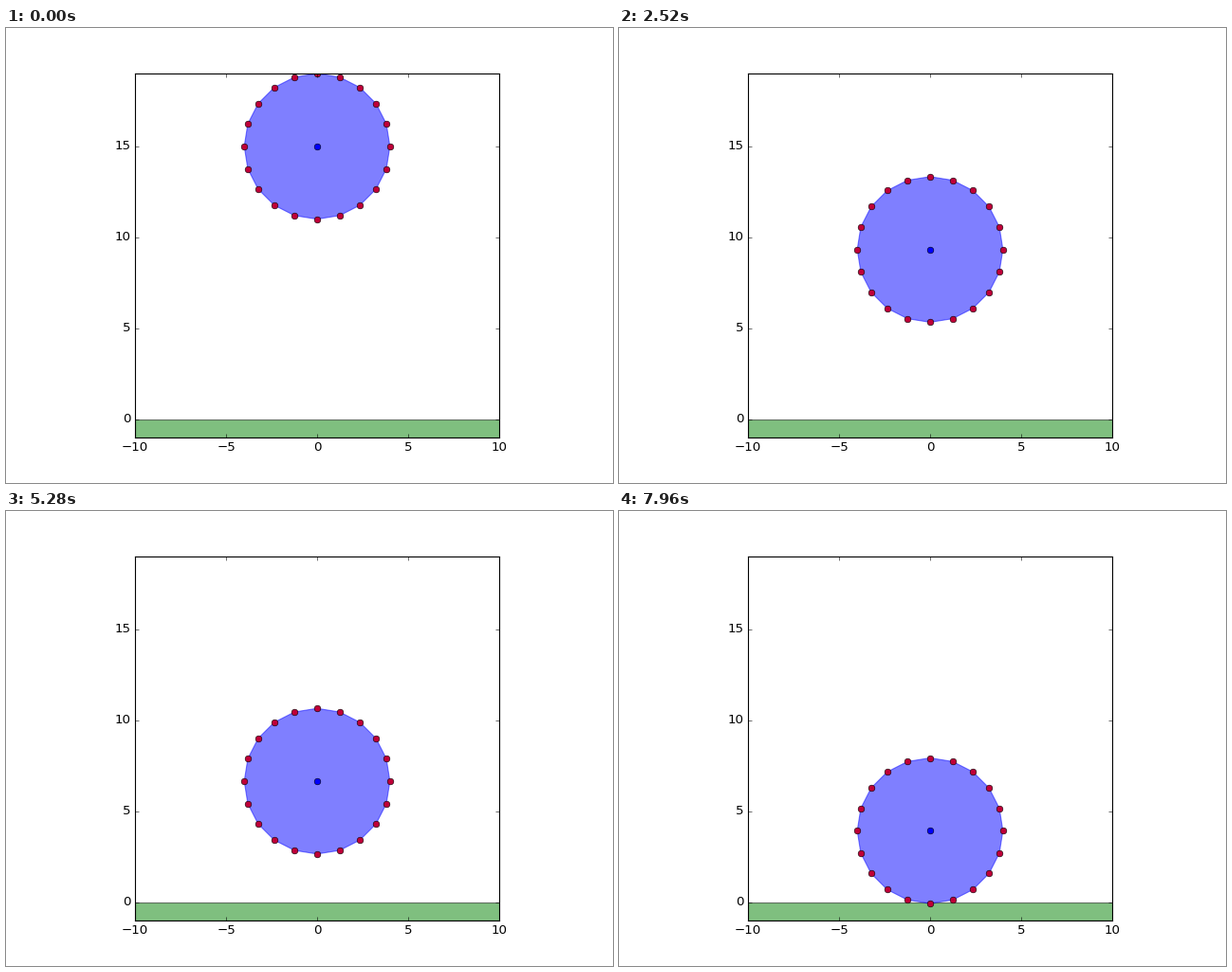
A matplotlib script for the animation above (8000 ms loop, 640 by 480 pixels).

```python
import numpy as np
import matplotlib.pyplot as plt
from matplotlib.animation import FuncAnimation
from matplotlib.patches import Polygon, Rectangle

plt.style.use("classic")
plt.rcParams.update({
    "font.family": "DejaVu Sans",
    "savefig.dpi": "figure",
    "figure.facecolor": "white",
})

FRAMES, INTERVAL = 200, 40
RADIUS, START = 4.0, 15.0
G = 9.81 / 3600            # gravity in units per frame squared
LEAVE, V_OUT = 102.7, 0.1305

# Moment and speed of the first touch of the ground
HIT = np.sqrt(2 * (START - RADIUS) / G + 0.25) - 1.5
V_IN = G * (HIT + 1.5)


def height(n):
    """Centre of the ball: free fall, springy contact, rebound."""
    if n < HIT:
        return START - G * (n + 1) * (n + 2) / 2
    if n < LEAVE:
        span, t = LEAVE - HIT, n - HIT
        w = np.pi / span
        decay = (V_OUT / V_IN) ** (t / span)
        return RADIUS - V_IN / w * decay * np.sin(w * t)
    t = n - LEAVE
    return RADIUS + V_OUT * t - G * t * t / 2


angles = np.arange(20) * np.pi / 10
rim = RADIUS * np.column_stack([np.cos(angles), np.sin(angles)])

fig = plt.figure(figsize=(8, 6), dpi=80)
ax = fig.add_axes([136 / 640, 0.1, 384 / 640, 0.8])
ax.set_xlim(-10, 10)
ax.set_ylim(-1, 19)
ax.set_xticks(range(-10, 11, 5))
ax.set_yticks(range(0, 16, 5))

ax.add_patch(Rectangle((-10, -1), 20, 1, fc="green", ec="black", alpha=0.5))
ball = ax.add_patch(Polygon(rim, closed=True, color="blue", alpha=0.5))
nodes, = ax.plot([], [], "o", color="#bf0038")
centre, = ax.plot([], [], "o", color="blue")


def update(n):
    y = height(n)
    points = rim + [0, y]
    ball.set_xy(points)
    nodes.set_data(points[:, 0], points[:, 1])
    centre.set_data([0], [y])
    return ball, nodes, centre


anim = FuncAnimation(fig, update, frames=FRAMES, interval=INTERVAL,
                     repeat=True, repeat_delay=0, blit=False)
plt.show()
```
